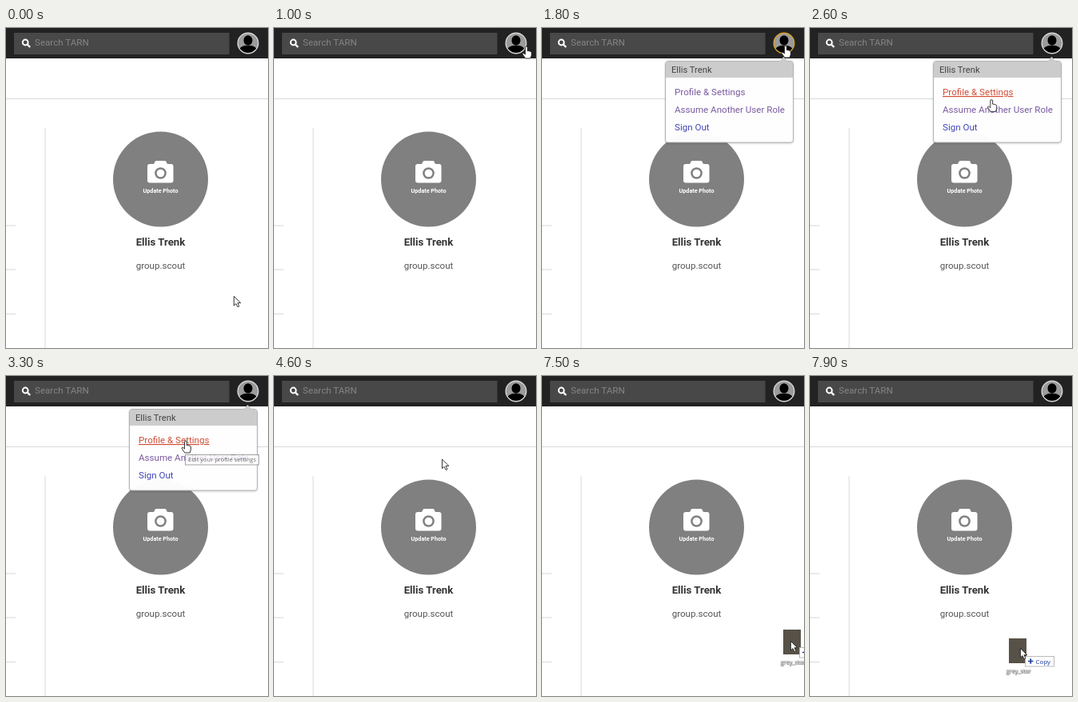
These frames come from a looping animation (328 by 400 pixels, 8 s). An HTML page:

```html
<!DOCTYPE html>
<html lang="en">
<head>
<meta charset="utf-8">
<title>Profile photo</title>
<style>
  html, body { margin: 0; width: 100%; height: 100%; overflow: hidden; background: #fff; }
  svg { display: block; width: 328px; height: 400px; font: 11.6px Roboto, sans-serif; }
  .rule { stroke: #d8d8d8; }
  .small { font-family: "Open Sans", sans-serif; }
  .link { fill: #7a5a9f; }
  .link.fresh { fill: #4046b8; }
  .link.hover { fill: #d04e36; text-decoration: underline; }
  #menu { filter: drop-shadow(0 1px 1px #0003); }
  .caption { fill: #e4e4e4; text-shadow: .6px .6px 1px #444, 0 0 1px #777; }
</style>
</head>
<body>
<svg viewBox="0 0 328 400">
  <rect width="328" height="38" fill="#222"/>
  <rect x="10" y="6" width="269.5" height="27" fill="#484848"/>
  <g fill="none" stroke="#fff" stroke-width="2">
    <circle cx="24.2" cy="18" r="3.4"/>
    <path d="M26.8 20.6L30.2 24" stroke-width="2.4"/>
  </g>
  <text x="36" y="22" fill="#858585">Search TARN</text>

  <clipPath id="face"><circle cx="303" cy="19" r="12.5"/></clipPath>
  <circle cx="303" cy="19" r="12.5" fill="#9b9b9b"/>
  <g clip-path="url(#face)">
    <ellipse cx="303" cy="15.5" rx="5.5" ry="6.2"/>
    <path d="M292 32V27q1-3.500 6.500-5h9q5.500 1.500 6.500 5v5z"/>
  </g>
  <circle id="ring" cx="303" cy="19" r="12.8" fill="none" stroke-width="1.4"/>

  <path class="rule" d="M0 88.500H328M49 125V400M0 247H12M0 302H12M0 357.500H12"/>
  <circle cx="193.5" cy="189" r="59.5" fill="#808080"/>
  <path fill="#fff" d="M180 170h5l1.500-3q.5-1 2-1h10q1.500 0 2 1l1.500 3h4.500q3 0 3 3v17.500q0 3-3 3h-26.500q-3 0-3-3V173q0-3 3-3z"/>
  <circle cx="193.5" cy="181.500" r="6.1" fill="none" stroke="#808080" stroke-width="2.500"/>
  <g text-anchor="middle">
    <text x="193.5" y="205.8" font-size="7.2" font-weight="700" fill="#fff">Update Photo</text>
    <text x="193.5" y="272" font-size="13.2" font-weight="700" fill="#333">Ellis Trenk</text>
    <text x="193.5" y="300.500" fill="#555">group.scout</text>
  </g>

  <g id="menu">
    <rect x="154.5" y="41.500" width="160" height="101.500" rx="3" fill="#fff" fill-opacity=".97" stroke="#b4b4b4"/>
    <path d="M155 62V44q0-2 2-2h155q2 0 2 2v18z" fill="#ccc"/>
    <path d="M297 42l5.500-6 5.500 6z" fill="#ccc"/>
    <text x="162" y="55.500" font-size="11.2" fill="#444">Ellis Trenk</text>
    <text class="link" x="166" y="84">Profile &amp; Settings</text>
    <text class="link" x="166" y="106">Assume Another User Role</text>
    <text class="link fresh" x="166" y="128">Sign Out</text>
  </g>
  <g id="tip" class="small">
    <rect x="224.5" y="98.500" width="92" height="12.500" fill="#fff" stroke="#777" stroke-width=".9"/>
    <text x="228" y="107.300" font-size="7.500" fill="#444">Edit your profile settings</text>
  </g>

  <g id="drag" class="small">
    <rect width="22" height="31" fill="#453f34" opacity=".9"/>
    <text class="caption" x="-3.500" y="43" font-size="7.300">grey_star</text>
    <g transform="translate(20 22)">
      <rect x=".5" y=".5" width="36" height="12.500" fill="#fff" stroke="#aaa" stroke-width=".8"/>
      <path d="M4 6.500h6.500M7.250 3.250v6.500" stroke="#1c3f9f" stroke-width="1.700"/>
      <text x="13.500" y="9.500" font-size="8" fill="#1c3f9f">Copy</text>
    </g>
  </g>
  <g id="cursor" fill="#fff" stroke="#222" stroke-width=".9" stroke-linejoin="round">
    <path id="arrow" d="M.4.4V12L3 9.600 5 13.700 6.900 12.900 5 8.700H8.800z"/>
    <path id="hand" d="M-1.500 8V1.400a1.400 1.400 0 0 1 2.800 0V5.500l1.800.2 1.800.5 1.500 1V11l-1.300 4h-6.300l-3-4.200q-1.500-2.200 0-2.500 1.200 0 2.700 1.800z"/>
  </g>
</svg>
<script>
const LOOP = 8000, STEP = 100;
const $ = id => document.getElementById(id);
const links = document.querySelectorAll('.link');

// Resting points of the pointer
const page = [280, 332], edge = [316, 23], avatar = [305, 22], profile = [225, 81];
const above = [202, 116], away = [305, 139];

// Each glide eases along a curve; bend is its optional control point
const glides = [
  { start: 0, end: 100, from: [285, 335], to: page },
  { start: 200, end: 1000, from: page, to: edge, bend: [225, 190] },
  { start: 1000, end: 1400, from: edge, to: avatar },
  { start: 2000, end: 2700, from: avatar, to: profile, bend: [245, 165] },
  { start: 4300, end: 4800, from: profile, to: above },
  { start: 5000, end: 5500, from: above, to: away }
];
const iconGlide = { start: 7500, end: 7900, from: [302, 317], to: [249, 328] };
const grabGlide = { start: 7500, end: 7900, from: [311, 331], to: [263, 340] };

const within = (t, from, to) => t >= from && t < to;
const ramp = (t, from, to) => Math.min(1, Math.max(0, (t - from) / (to - from)));
const mix = (a, b, k) => a + (b - a) * k;

function along({ start, end, from, to, bend }, t) {
  const u = ramp(t, start, end), k = u * u * (3 - 2 * u);
  return from.map((a, i) => {
    const mid = bend ? bend[i] : (a + to[i]) / 2;
    return mix(mix(a, mid, k), mix(mid, to[i], k), k);
  });
}
const place = (id, [x, y]) => $(id).setAttribute('transform', `translate(${x} ${y})`);
const show = (id, on) => $(id).style.display = on ? '' : 'none';

function draw(t) {
  const dragging = t >= iconGlide.start;
  const menuOpen = within(t, 1200, 3500);
  const glide = dragging ? grabGlide : glides.findLast(g => t >= g.start);
  const [x, y] = along(glide, t);

  const onAvatar = Math.hypot(x - 303, y - 19) < 16;
  const hovered = menuOpen && x < 304 ? [84, 106, 128].findIndex(base => Math.abs(y - base + 3) < 9) : -1;
  const pointing = onAvatar || hovered >= 0 || within(t, 3500, 3800);

  place('cursor', [x, y]);
  show('cursor', t < 5500 || dragging);
  show('hand', pointing);
  show('arrow', !pointing);
  place('drag', along(iconGlide, t));
  show('drag', dragging);

  $('ring').setAttribute('stroke', within(t, 1100, 2200) ? '#dca42c' : '#d6d6d6');
  $('menu').style.opacity = menuOpen ? ramp(t, 1200, 1600) : 0;
  $('tip').style.opacity = menuOpen ? ramp(t, 2800, 3450) : 0;
  links.forEach((link, i) => link.classList.toggle('hover', i === hovered));
}

const start = performance.now();
function tick() {
  const t = (performance.now() - start) % LOOP;
  draw(Math.floor(t / STEP) * STEP);
  requestAnimationFrame(tick);
}
tick();
</script>
</body>
</html>
```
